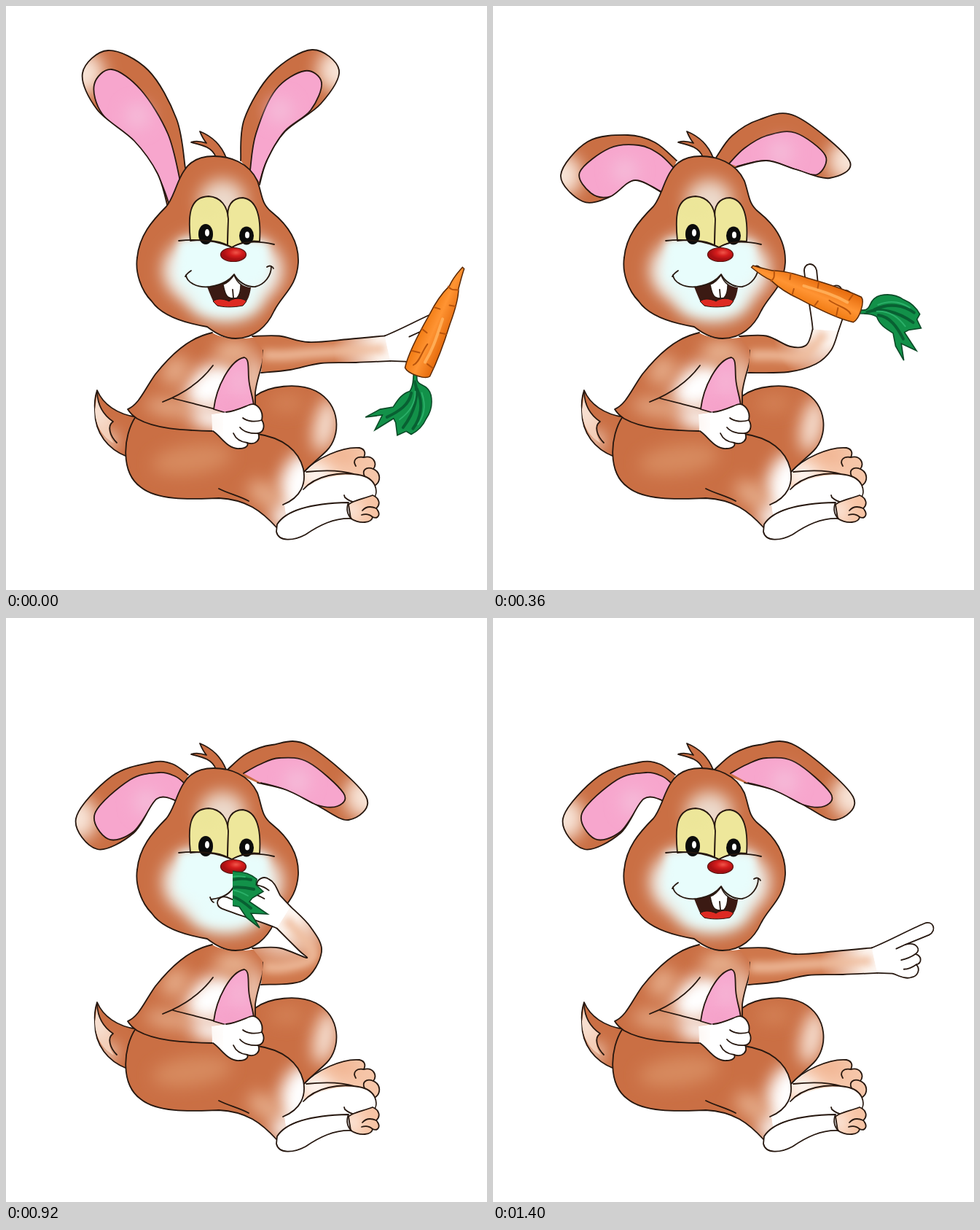
Recreate the animation shown at these times as an HTML page. Size 660 by 801 pixels, loop 1.48 s.

```html
<!DOCTYPE html>
<html lang="en">
<head>
<meta charset="utf-8">
<title>Rabbit and carrot</title>
<style>
html, body { margin: 0; width: 100%; height: 100%; overflow: hidden; background: #fff; }
svg { display: block; width: 100vw; height: 100vh; }
.line { fill: none; stroke: #26170f; stroke-width: 1.8; stroke-linecap: round; stroke-linejoin: round; }
</style>
</head>
<body>
<svg id="stage" viewBox="0 0 660 801"></svg>
<script>
const FUR = '#ca6f44', SOFT = '#e5ab88', PALE = '#f8e3d6', WHITE = '#fff', PINK = '#f7a6cd', ROSE = '#f5bcd9';
const LOOP = 1480, STEP = 40, LAST = 35;
let count = 0;

const line = (d, extra = '') => `<path class="line" d="${d}" ${extra}/>`;
const shape = (d, fill, extra = '') => `<path d="${d}" fill="${fill}" ${extra}/>`;
const oval = (x, y, rx, ry, fill, extra = '') =>
  `<ellipse cx="${x}" cy="${y}" rx="${rx}" ry="${ry}" fill="${fill}" ${extra}/>`;

// Filled shape with blurred spots inside: [x, y, rx, ry, colour, angle]
function part(d, fill, spots = [], edge = d) {
  const id = 'c' + count++;
  const glow = spots.map(([x, y, rx, ry, c, a = 0]) =>
    oval(x, y, rx, ry, c, `filter="url(#blur)" transform="rotate(${a} ${x} ${y})"`)).join('');
  return `<clipPath id="${id}"><path d="${d}"/></clipPath>` +
    `<g clip-path="url(#${id})">${shape(d, fill)}${glow}</g>${line(edge)}`;
}

// Moving parts whose outline is set on each update
const limb = (id, fill, glow) =>
  `<clipPath id="${id}Clip"><path id="${id}Mask"/></clipPath><path id="${id}Fill" fill="${fill}"/>` +
  `<g clip-path="url(#${id}Clip)">${glow}</g><path id="${id}Line" class="line"/>`;
const ear = id => limb(id, FUR,
  `<circle id="${id}Tip" r="30" fill="${PALE}" filter="url(#blur)"/>
   <path id="${id}Pink" class="line" style="fill:${PINK}"/>
   <circle id="${id}Shine" r="17" fill="${ROSE}" filter="url(#blur)"/>`);

const defs = `<defs>
  <filter id="blur" x="-100%" y="-100%" width="300%" height="300%"><feGaussianBlur stdDeviation="11"/></filter>
  <filter id="haze" x="-50%" y="-50%" width="200%" height="200%" filterUnits="userSpaceOnUse"><feGaussianBlur stdDeviation="6"/></filter>
  <radialGradient id="sleeve" gradientUnits="userSpaceOnUse" r="72">
    <stop offset="0" stop-color="#fff"/><stop offset=".22" stop-color="#fdf6f1"/>
    <stop offset="1" stop-color="#cf774b"/></radialGradient>
  <radialGradient id="nose" cx=".6" cy=".35"><stop offset="0" stop-color="#f0564a"/>
    <stop offset=".5" stop-color="#d51d1d"/><stop offset="1" stop-color="#a80f12"/></radialGradient>
  <linearGradient id="root"><stop offset="0" stop-color="#f07a12"/>
    <stop offset=".45" stop-color="#ff9433"/><stop offset="1" stop-color="#e56a0c"/></linearGradient>
  <clipPath id="bite"><rect id="biteBox" y="0" width="660" height="801"/></clipPath>
</defs>`;

const tail = part('M125,527 C133,546 152,560 180,564 L166,618 C140,608 122,586 122,556 C121,545 122,536 125,527Z',
  FUR, [[138, 596, 15, 12, PALE]]) +
  part('M125,530 C126,552 138,564 147,570 C138,576 142,592 149,600 C132,592 122,575 122,553Z', '#f3cdb6',
    [[127, 556, 6, 22, WHITE]], 'M125,530 C126,552 138,564 147,570 C138,576 143,590 152,599');

const farLeg = part('M342,535 C360,521 400,516 425,528 C460,546 460,590 440,610 C430,620 418,629 408,640 C405,620 380,592 335,587Z',
  FUR, [[438, 575, 15, 38, PALE, 12], [385, 545, 24, 12, '#d48257']],
  'M342,535 C360,521 400,516 425,528 C460,546 460,590 440,610 C430,620 418,629 408,640');

const feet = part('M407,645 C425,620 462,604 485,606 C494,608 493,615 491,619 C504,616 510,627 504,635 C515,640 514,652 505,659 L480,662 L409,665Z',
    '#f6c6a9', [[425, 643, 24, 15, WHITE], [460, 616, 25, 7, '#eda781']],
    'M408,640 C425,620 462,604 485,606 C494,608 493,615 491,619 C504,616 510,627 504,635 C515,640 514,652 507,657') +
  line('M491,619 C481,617 475,623 480,631 M504,635 C494,631 488,637 492,645') +
  shape('M372,712 L380,684 C400,662 440,640 480,643 C505,646 512,662 505,676 L470,684 Z', WHITE) +
  line('M408,663 C425,644 458,638 484,643 C508,647 513,667 503,678 C492,686 474,682 465,674 L464,671 M412,639 C430,637 455,635 478,642') +
  part('M470,684 C473,679 490,676 503,671 C513,675 514,684 508,689 C515,697 511,704 503,701 C502,709 486,711 473,703Z',
    '#f7c4a5', [[474, 692, 10, 14, WHITE]]) +
  line('M508,689 C501,686 494,686 489,692 M503,701 C498,696 491,697 488,698');

const thigh = part('M178,563 C160,590 157,640 185,660 C210,680 260,676 292,675 C330,677 350,692 372,716 L384,698 L382,684 C405,674 412,655 408,635 C402,610 380,592 345,587 L250,560Z',
    FUR, [[255, 622, 55, 20, '#d78a5f', -8], [402, 655, 26, 44, WHITE, 15], [355, 670, 26, 15, SOFT, 35], [385, 702, 22, 15, WHITE]],
    'M178,563 C160,590 157,640 185,660 C210,680 260,676 292,675 C330,677 350,692 372,716 M345,587 C380,592 402,610 408,635 C412,655 405,674 380,684') +
  line('M292,662 C306,669 320,672 333,679') +
  part('M372,711 C385,690 425,682 470,681 C466,690 469,699 474,703 C450,702 430,712 411,725 C394,734 374,735 371,721Z', WHITE);

const torso = part('M283,448 C250,455 225,480 205,505 C190,526 183,546 167,553 C170,558 174,562 180,566 C205,580 240,582 284,583 L345,590 L342,530 C345,505 354,490 353,472 L352,452 C330,458 300,458 283,448Z',
    FUR, [[283, 522, 40, 29, WHITE, -30], [232, 500, 22, 17, SOFT, -48], [225, 551, 35, 11, SOFT, 10],
      [285, 567, 32, 14, WHITE, 8], [312, 474, 26, 14, '#eab897'], [340, 510, 10, 32, PALE]],
    'M283,448 C250,455 225,480 205,505 C190,526 183,546 167,553 C170,558 174,562 180,566 C205,580 240,582 284,583') +
  line('M353,472 C355,490 345,505 342,530 L342,547 M284,493 C270,512 248,530 215,543 M229,538 C255,545 278,550 302,557') +
  part('M285,553 C289,520 309,485 327,482 C334,484 332,497 333,510 C334,526 339,536 340,549 L302,558Z', PINK,
    [[320, 515, 9, 17, ROSE], [310, 550, 18, 6, '#f29bc4']]);

const paw = part('M283,583 C295,590 304,608 320,607 C329,607 333,603 331,599 C342,603 350,595 346,586 C355,584 355,574 351,568 C354,555 344,543 334,547 C324,551 314,556 302,557 L282,560Z',
    WHITE, [[280, 574, 6, 14, PALE]],
    'M284,583 C295,590 304,608 320,607 C329,607 333,603 331,599 C342,603 350,595 346,586 C355,584 355,574 351,568 C354,555 344,543 334,547 C324,551 314,556 302,557') +
  line('M331,599 C322,598 315,593 312,586 M346,586 C336,587 326,584 321,578 M351,568 C342,571 331,570 325,565');

const head = part('M288,208 C284,193 266,190 254,187 C261,184 269,186 275,188 C270,182 268,177 266,172 C281,178 295,190 302,208Z', FUR) +
  part('M245,225 C254,211 269,206 285,206 C306,206 333,214 345,240 C352,260 350,271 365,283 C390,303 402,326 401,352 C399,385 380,395 368,418 C358,440 340,456 315,456 C300,456 288,449 276,440 C252,436 215,427 200,405 C185,390 177,365 180,345 C183,315 200,295 220,275 C231,262 234,240 245,225Z',
    FUR, [[297, 268, 32, 30, '#ecd9cb'], [298, 362, 83, 56, '#f0e6de'], [296, 365, 66, 45, '#e8fdfc'],
      [302, 405, 48, 28, '#e8fdfc']]) +
  shape('M237,322 C265,319 290,322 310,331 C325,322 345,322 360,326 L355,375 L240,375Z', '#e8fdfc', 'filter="url(#haze)"') +
  part('M253,322 C250,290 250,262 278,261 C295,262 304,275 305,292 L304,328 C290,321 268,320 253,322Z', '#eee79b', [[274, 275, 17, 8, '#eae497']]) +
  part('M305,292 C302,275 310,263 325,263 C346,266 350,292 348,323 C335,321 322,324 310,331 L304,328Z', '#eee79b') +
  oval(274, 313, 10, 14, '#0b0b0b') + oval(276, 311, 3, 5, WHITE) +
  oval(330, 315, 10, 12.5, '#0b0b0b') + oval(331, 314, 3, 4.5, WHITE) +
  line('M237,322 C265,319 290,322 310,331 C325,322 345,322 368,327') +
  oval(312, 341, 17.5, 9.5, 'url(#nose)', 'stroke="#5b1410" stroke-width="1.2"');

const teeth = shape('M298,382 C300,392 302,399 307,400 C310,401 314,401 317,400 C321,396 322,389 322,382 C317,378 314,372 313,369 C308,376 304,380 298,382Z',
  WHITE, 'stroke="#26170f" stroke-width="1.3"');
const smile = `<g id="smile">` +
  shape('M276,385 C282,400 285,410 292,412 L325,411 C332,405 335,395 336,386 C325,386 315,376 313,369 C305,378 295,384 276,385Z', '#3b1a13') +
  shape('M284,405 C290,400 300,402 306,405 C312,400 325,400 330,405 L325,411 C310,414 297,413 290,411Z', '#dd2a22', 'stroke="#26170f"') +
  teeth + line('M311,389 L312,400') +
  line('M247,369 C248,379 262,387 280,385 C300,382 308,374 313,368 C318,378 330,386 342,385 C355,382 364,370 364,357 M246,371 C248,367 251,365 254,363 M358,358 C362,355 366,357 367,360') +
  `</g>`;
const chew = `<g id="chew">` + teeth + line('M311,390 L310,400 M280,383 C281,386 282,389 285,390 M281,386 C298,384 308,378 313,367 C315,373 319,377 323,378') + `</g>`;

const handFill = 'M-17,-5 C-17,-25 -22,-60 -23,-84 C-24,-97 -8,-98 -6,-85 L-5,-50 C-3,-66 10,-68 12,-58 C18,-66 27,-62 26,-54 C34,-58 42,-50 40,-42 C40,-32 30,-25 26,-19 L18,0';
const hand = `<g id="hand">${shape(handFill, WHITE)}${line(handFill)}` +
  line('M-5,-50 L-4,-36 M12,-58 C14,-50 14,-46 13,-37 M26,-54 C28,-46 28,-42 26,-36') + `</g>`;
const arm = limb('arm', 'url(#sleeve)',
  `<path id="armGlow" fill="none" stroke="#efbd9e" stroke-width="13" filter="url(#haze)"/>`);

const carrot = `<g clip-path="url(#bite)"><g id="carrot">` +
  shape('M0,-4 C4,10 6,12 14,12 C22,12 28,16 31,20 C38,30 40,42 38,52 C38,64 33,74 28,80 L20,79 L11,89 L2,74 L-3,70 L-20,95 L-19,72 L-39,84 L-25,66 L-10,56 C-8,45 -7,35 2,27 C4,20 0,10 -4,0Z',
    '#129149', 'stroke="#0b4a27" stroke-width="1.6"') +
  line('M3,12 C16,26 20,50 14,76 M10,20 C27,35 31,55 27,72 M5,28 C9,44 0,58 -12,72', 'style="stroke:#086032;stroke-width:4"') +
  line('M9,24 C17,40 12,56 5,68 M18,22 C33,38 33,52 31,64', 'style="stroke:#2bb069"') +
  shape('M-17,0 C-21,-20 -19,-50 -16,-80 C-15,-104 -11,-117 -7,-127 C-7,-140 -4,-148 -1,-158 L2,-157 C3,-145 5,-136 6,-129 C11,-118 14,-95 15,-80 C18,-55 20,-25 19,-3 C15,4 -10,6 -17,0Z',
    'url(#root)', 'stroke="#5a2a08" stroke-width="1.5"') +
  line('M-18,-25 L-7,-27 M18,-15 L9,-17 M-17,-58 L-9,-56 M16,-65 L7,-63 M-14,-92 L-6,-93 M-8,-126 C-2,-122 2,-126 6,-127 M12,-105 L4,-103 M-8,-8 C-2,-14 -5,-28 -2,-42',
    'style="stroke:#b9540c;stroke-width:2"') +
  line('M5,-18 C8,-40 5,-60 3,-82', 'style="stroke:#ffac55;stroke-width:4"') + `</g></g>`;

document.getElementById('stage').innerHTML = defs + tail + farLeg + feet + thigh + torso + paw +
  ear('left') + ear('right') + head + smile + chew + arm + hand + carrot;

const nums = s => s.split(/[ ,]+/).map(Number);
const mix = (a, b, k) => a.map((v, i) => v + (b[i] - v) * k);
function at(keys, t) {
  let i = 0;
  while (i < keys.length - 1 && keys[i + 1][0] <= t) i++;
  if (i === keys.length - 1) return keys[i][1];
  const [t0, a] = keys[i], [t1, b] = keys[i + 1];
  return mix(a, b, (t - t0) / (t1 - t0));
}
const earTimes = [0, 160, 360, 480];
const earKeys = poses => poses.map((p, i) => [earTimes[i], nums(p)]);

const ears = {
  left: earKeys([
    '246,222 234,155 195,88 140,61 105,92 125,142 176,185 208,230 222,276',
    '250,216 226,160 185,128 135,117 98,148 122,188 175,198 212,230 228,268',
    '252,212 222,187 185,177 130,186 93,232 123,268 160,262 195,239 235,258',
    '250,215 228,200 200,198 145,217 96,275 125,317 175,295 207,248 237,252']),
  leftPink: earKeys([
    '239,240 222,175 185,115 145,87 121,108 132,148 176,187 208,232 224,272',
    '244,232 225,185 190,148 150,136 124,160 135,188 176,199 212,230 228,262',
    '248,222 228,203 200,191 160,195 119,228 135,257 162,261 195,240 232,255',
    '244,226 232,217 210,212 170,222 122,268 140,303 175,293 207,250 236,252']),
  right: earKeys([
    '322,212 327,155 365,92 420,60 457,88 432,134 383,172 358,212 348,245',
    '314,210 330,165 365,124 425,104 475,138 440,175 390,187 352,208 335,232',
    '306,208 328,178 365,156 415,151 489,212 462,236 415,224 375,212 330,222',
    '304,208 330,186 365,174 415,175 494,245 470,277 425,256 385,236 345,226']),
  rightPink: earKeys([
    '335,225 343,175 370,115 410,89 433,105 418,143 382,172 358,212 348,242',
    '327,219 343,183 370,148 415,129 442,150 425,178 390,187 352,208 335,230',
    '324,216 345,195 375,178 415,174 456,205 445,231 415,224 375,212 335,220',
    '326,213 348,201 375,192 415,198 463,240 455,258 425,256 385,236 350,226'])
};

// Wrist x, y, hand angle, then two points on the inner and three on the outer edge
const reach = nums('521,470 69.5,415,461 470,457 480,489 432,490 390,499');
const bend = nums('500,457 40,412,461 452,455 475,483 428,492 390,499');
const lift = nums('456,447 -4,408,467 430,465 464,472 443,491 405,502');
const point = nums('458,445 0,403,464 428,466 464,470 441,489 402,502');
const munch = nums('400,424 -49,417,468 413,460 435,433 441,470 412,499');
const stuff = nums('383,412 -66,412,466 402,456 418,424 433,458 408,497');
const armKeys = [[0, reach], [160, bend], [360, lift], [560, mix(lift, munch, .3)], [680, munch],
  [920, stuff], [1000, stuff], [1120, munch], [1240, point], [1400, reach]];
const carrotKeys = [[0, [563, 503, 24]], [160, [567, 478, -14.5]], [360, [501, 418, -67.5]],
  [560, [476, 412, -75]], [680, [415, 405, -87]], [920, [264, 386, -90]], [1000, [214, 380, -90]]];
const biteKeys = [[0, [323]], [680, [323]], [920, [311]]];

// Smooth curve through points given as a flat list
function curve(p, start = 'M') {
  const n = p.length / 2, pt = i => { i = Math.max(0, Math.min(n - 1, i)); return [p[2 * i], p[2 * i + 1]]; };
  let d = start + pt(0);
  for (let i = 0; i < n - 1; i++) {
    const [a, b, c, e] = [pt(i - 1), pt(i), pt(i + 1), pt(i + 2)];
    d += `C${b.map((v, k) => v + (c[k] - a[k]) / 6)} ${c.map((v, k) => v - (e[k] - b[k]) / 6)} ${c}`;
  }
  return d;
}
const $ = id => document.getElementById(id);
const set = (id, attrs) => { for (const k in attrs) $(id).setAttribute(k, attrs[k]); };
function outline(id, fill, edge) {
  set(id + 'Mask', { d: fill });
  set(id + 'Fill', { d: fill });
  set(id + 'Line', { d: edge });
}

function drawEar(id, t) {
  const p = at(ears[id], t), q = at(ears[id + 'Pink'], t), d = curve(p);
  outline(id, d, d);
  set(id + 'Tip', { cx: p[8], cy: p[9] });
  set(id + 'Pink', { d: curve(q) });
  set(id + 'Shine', { cx: (q[4] + q[12]) / 2, cy: (q[5] + q[13]) / 2 });
}

function drawArm(t) {
  const [x, y, turn, ...p] = at(armKeys, t), a = turn * Math.PI / 180;
  const spin = (u, v) => [x + u * Math.cos(a) - v * Math.sin(a), y + u * Math.sin(a) + v * Math.cos(a)];
  const inner = [338, 453, 375, 452.5, ...p.slice(0, 4), ...spin(-17, -5)];
  const outer = [...spin(18, 0), ...p.slice(4), 350, 503];
  outline('arm', curve(inner) + curve(outer, 'L') + 'L353,472Z', curve(inner) + curve(outer));
  set('armGlow', { d: curve([352, 479, 385, 479, (p[0] + p[6]) / 2, (p[1] + p[7]) / 2, x, y]) });
  set('sleeve', { cx: x, cy: y });
  set('hand', { transform: `translate(${x} ${y}) rotate(${turn})` });
}

function draw(t) {
  drawEar('left', t);
  drawEar('right', t);
  drawArm(t);
  const [x, y, turn] = at(carrotKeys, t), eating = t >= 600 && t < 1120;
  set('carrot', { transform: `translate(${x} ${y}) rotate(${turn})`, visibility: t < 1000 ? 'visible' : 'hidden' });
  set('biteBox', { x: at(biteKeys, t)[0] });
  set('smile', { visibility: eating ? 'hidden' : 'visible' });
  set('chew', { visibility: eating ? 'visible' : 'hidden' });
}

const begin = performance.now();
function tick() {
  const t = (performance.now() - begin) % LOOP;
  draw(Math.min(LAST, Math.floor(t / STEP)) * STEP);
  requestAnimationFrame(tick);
}
tick();
</script>
</body>
</html>
```
